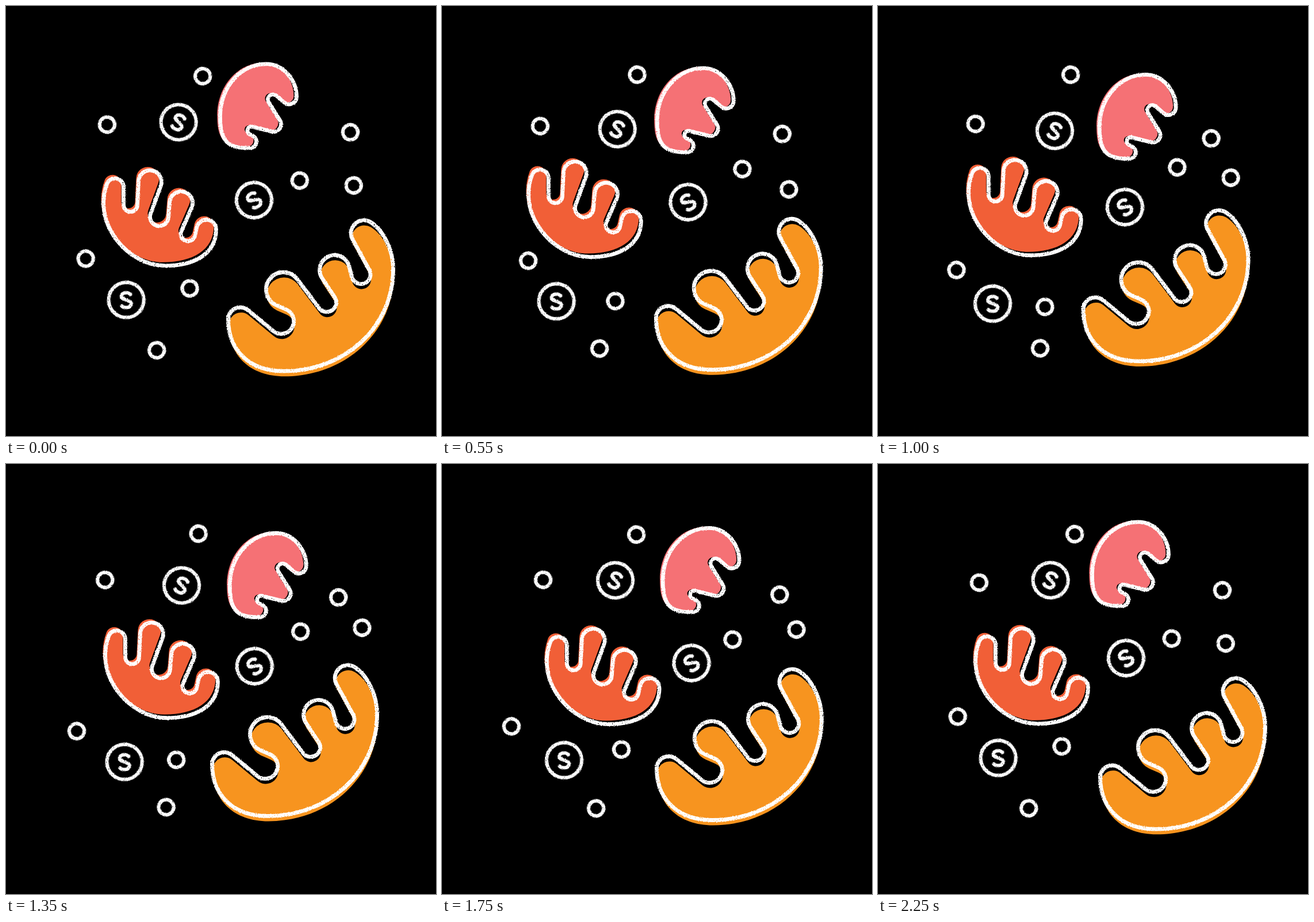
These frames come from a looping animation (748x748 px, 2300 ms). An HTML page:

```html
<!DOCTYPE html>
<html lang="en">
<head>
<meta charset="utf-8">
<title>Drifting shapes</title>
<style>
  html, body { margin: 0; width: 100%; height: 100%; overflow: hidden; background: #000; }
  svg { display: block; width: 100vw; height: 100vh; }
  .chalk { fill: none; stroke: #fff; stroke-linecap: round; stroke-linejoin: round; }
</style>
</head>
<body>
<svg id="stage" viewBox="0 0 748 748">
  <defs>
    <filter id="rough" x="-30%" y="-30%" width="160%" height="160%" color-interpolation-filters="sRGB">
      <feTurbulence type="fractalNoise" baseFrequency=".5" numOctaves="2" seed="4" result="warp"/>
      <feDisplacementMap in="SourceGraphic" in2="warp" scale="2.6" xChannelSelector="R" yChannelSelector="G" result="line"/>
      <feTurbulence type="fractalNoise" baseFrequency=".6" numOctaves="1" seed="9"/>
      <feColorMatrix values="0 0 0 0 1  0 0 0 0 1  0 0 0 0 1  0 0 0 12 -3.2" result="grain"/>
      <feComposite in="line" in2="grain" operator="in"/>
    </filter>
  </defs>
</svg>
<script>
const stage = document.getElementById('stage');
const STEP = 50, LOOP = 2300, PERIOD = 2250, TURN = 2 * Math.PI;
const movers = [];

function add(parent, name, attrs) {
  const el = document.createElementNS('http://www.w3.org/2000/svg', name);
  for (const key in attrs) el.setAttribute(key, attrs[key]);
  return parent.appendChild(el);
}

// A group that circles (x, y) on an ellipse; each axis has a cosine and a sine reach.
function drift(x, y, [xCos, xSin], [yCos, ySin]) {
  const node = add(stage, 'g', {});
  movers.push(w => {
    const c = Math.cos(w), s = Math.sin(w);
    const px = x + xCos * c + xSin * s, py = y + yCos * c + ySin * s;
    node.setAttribute('transform', `translate(${px.toFixed(2)} ${py.toFixed(2)})`);
  });
  return node;
}

// A cord wound around circles [x, y, r], alternately finger tips and gaps.
function fingers(beads, from, to) {
  const rad = deg => deg * TURN / 360;
  const point = ([x, y, r], a) => (x + r * Math.cos(a)).toFixed(1) + ' ' + (y + r * Math.sin(a)).toFixed(1);
  let enter = rad(from), d = 'M' + point(beads[0], enter);
  beads.forEach((bead, i) => {
    const side = i % 2 ? -1 : 1, next = beads[i + 1];
    let leave = rad(to), heading;
    if (next) {
      const dx = next[0] - bead[0], dy = next[1] - bead[1];
      heading = Math.atan2(dy, dx) + side * Math.asin((bead[2] + next[2]) / Math.hypot(dx, dy));
      leave = heading - side * TURN / 4;
    }
    const span = (side * (leave - enter) % TURN + TURN) % TURN;
    d += `A${bead[2]} ${bead[2]} 0 ${+(span > TURN / 2)} ${+(side > 0)} ${point(bead, leave)}`;
    if (next) {
      enter = heading + side * TURN / 4;
      d += 'L' + point(next, enter);
    }
  });
  return d;
}

function blob(node, color, shift, d) {
  add(node, 'path', { d, fill: color, transform: `translate(${shift})` });
  add(node, 'path', { d, class: 'chalk', 'stroke-width': 6.8, filter: 'url(#rough)' });
}

function ring(...path) {
  const g = add(drift(...path), 'g', { transform: `rotate(${movers.length * 47})` });
  add(g, 'circle', { r: 13.2, class: 'chalk', 'stroke-width': 6, filter: 'url(#rough)' });
}

function coin(angle, ...path) {
  const g = add(drift(...path), 'g', { transform: `rotate(${angle})`, filter: 'url(#rough)' });
  add(g, 'circle', { r: 30.6, class: 'chalk', 'stroke-width': 6 });
  add(g, 'path', {
    d: 'M8-9C4-14-8-14-8-6.5C-8 0 8 0 8 7C8 14.5-4 15-8.5 10',
    class: 'chalk', 'stroke-width': 6
  });
}

blob(drift(8, 10.8, [-7.5, -5.5], [-10, -2.3]), '#f57175', '-5 -2',
  fingers([[492, 157, 13], [464, 162, 9], [465, 205, 13], [426.5, 216, 7], [424, 235, 11]], 0, 90)
  + 'C380 248 372 228 372 192C372 140 408 100 452 100C484 100 505 130 505 157Z');

blob(drift(-5, -9.2, [3.5, -15.8], [8, -7.5]), '#f15f37', '-4 -6',
  fingers([[191, 316, 15], [218, 347, 12], [252, 307, 20], [268, 368, 16],
    [306, 344, 20], [318, 398, 12.5], [350, 390, 17]], 200, 0)
  + 'C367 432 330 453 278 453C215 453 151 381 177 311Z');

blob(drift(-16.7, -11, [15.3, 0.5], [10.2, 7.4]), '#f7941f', '1 9',
  fingers([[409, 546, 21], [480, 549, 22], [484, 494, 30], [559, 516, 16.5],
    [573, 460, 26], [619, 468, 16.5], [624, 396, 22.5]], 180, -60)
  + 'C657 389.500 675 425 675 458C675 560 590 636 485 636C425 636 388 600 388 546Z');

ring(338.4, 121, [3.8, 1], [1, -1.6]);
ring(173.1, 205, [2.8, -2.4], [1.3, 3.8]);
ring(588.5, 225.6, [10.5, 3], [-6, -2.8]);
ring(514.4, 293.6, [-3.5, 8.3], [10, -10.3]);
ring(610.6, 302.3, [-5.8, -7], [9.8, 16.3]);
ring(134.9, 451, [3.8, 15], [-11.5, -7.5]);
ring(305.3, 506.5, [14.3, -4.3], [-15.3, 7.3]);
ring(272, 597.3, [-9.8, 2.3], [1.5, -1.5]);

coin(20, 303.7, 208.9, [-3.5, 1.6], [-6.8, 5.5]);
coin(-36, 431, 344.4, [0.5, -3], [-6.8, -3]);
coin(-4, 205.4, 514.8, [3.8, -6.5], [-3.5, -1]);

function draw(ms) {
  const t = Math.floor(ms % LOOP / STEP) * STEP;
  movers.forEach(move => move(t / PERIOD * TURN));
}

const start = performance.now();
function tick() {
  draw(performance.now() - start);
  requestAnimationFrame(tick);
}
tick();
</script>
</body>
</html>
```
